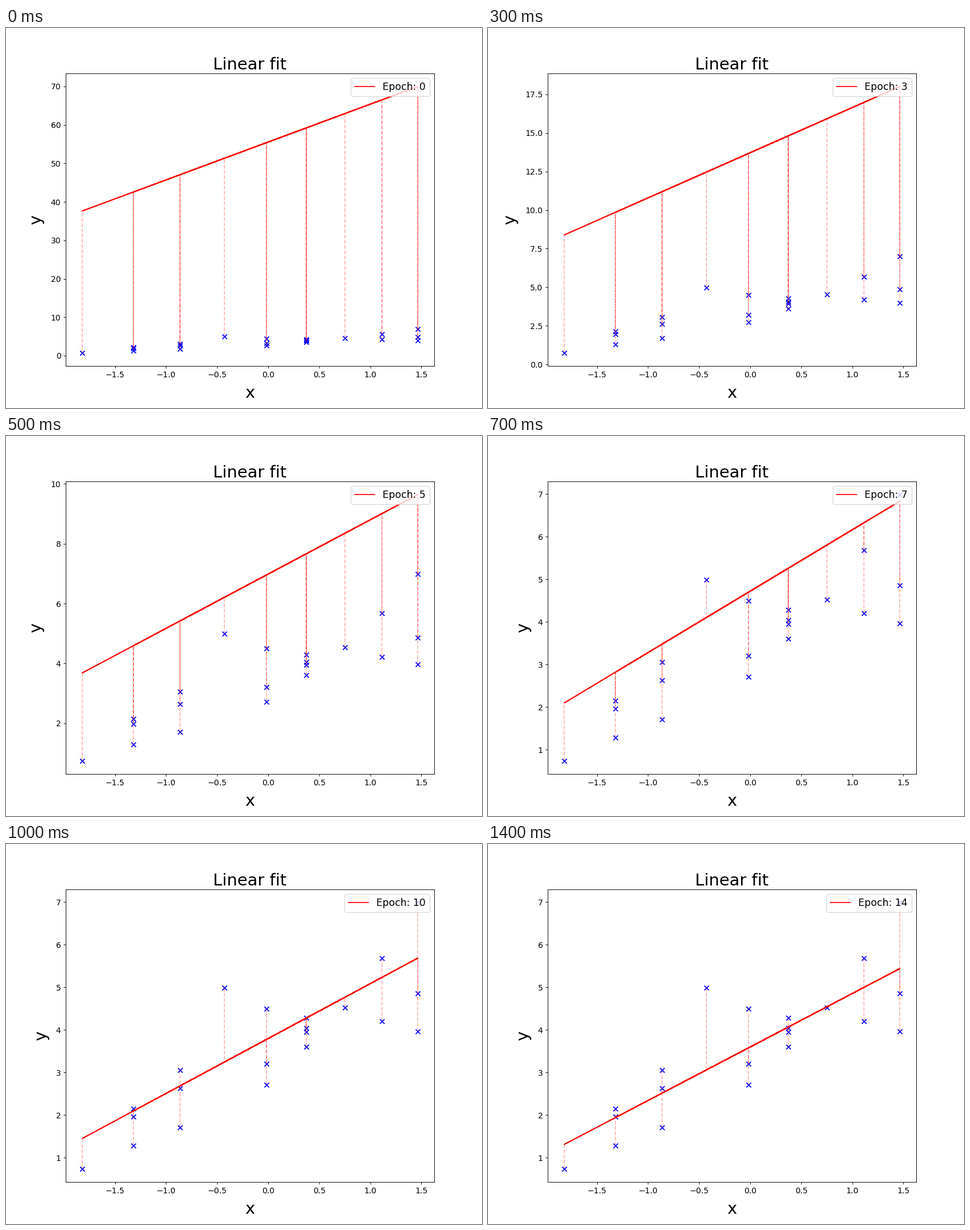
A matplotlib script that plays this animation: 837 by 669 pixels, repeating every 1500 ms.

```python
import matplotlib.pyplot as plt
import numpy as np
from matplotlib.animation import FuncAnimation

DPI = 83.7
NUDGE = 1e-6  # keeps the pixel size from rounding down
EPOCHS, INTERVAL = 15, 100
DECAY = 0.58  # share of the error left after each epoch
SLOPE_ERROR, BIAS_ERROR = 8.59, 51.98

# Measured values, grouped by evenly stepped x before scaling.
SAMPLES = [
    [0.74], [1.29, 1.97, 2.15], [1.71, 2.63, 3.06], [4.99],
    [2.71, 3.21, 4.50], [3.61, 3.95, 4.04, 4.29], [4.53],
    [4.21, 5.68], [3.97, 4.86, 6.99],
]


def standardise(values):
    return (values - values.mean()) / values.std()


steps = np.repeat(np.arange(len(SAMPLES)), [len(g) for g in SAMPLES])
order = (8 * np.arange(len(steps)) + 10) % len(steps)  # mixed, none repeated
xs = standardise((3.3 + steps) ** (2 / 3))[order]
ys = np.concatenate(SAMPLES)[order]
best_slope, best_bias = np.polyfit(xs, ys, 1)


def predict(epoch):
    """Gradient descent closes in on the best fit geometrically."""
    left = DECAY ** epoch
    slope = best_slope + SLOPE_ERROR * left
    return slope * xs + best_bias + BIAS_ERROR * left


def padded(values):
    low, high = np.min(values), np.max(values)
    pad = 0.05 * (high - low)
    return low - pad, high + pad


fig, ax = plt.subplots(figsize=(837 / DPI + NUDGE, 669 / DPI + NUDGE), dpi=DPI)
fig.subplots_adjust(top=0.8808)
ax.set_title("Linear fit", fontsize=25)
ax.set_xlabel("x", fontsize=25, labelpad=10)
ax.set_ylabel("y", fontsize=25, labelpad=10)
ax.tick_params(labelsize=12)

ax.scatter(xs, ys, s=50, marker="x", color="blue")
fit, = ax.plot(xs, predict(0), color="red", label="Epoch: 0")
errors = [ax.plot([x, x], [y, y], "--", color="red", alpha=0.3)[0]
          for x, y in zip(xs, ys)]
legend = ax.legend(loc="upper right", fontsize=15)
ax.set_xlim(padded(xs))


def draw(epoch):
    guess = predict(epoch)
    fit.set_ydata(guess)
    for line, y, end in zip(errors, ys, guess):
        line.set_ydata([y, end])
    ax.set_ylim(padded([ys, guess]))
    legend.get_texts()[0].set_text(f"Epoch: {epoch}")
    return [fit, legend, *errors]


anim = FuncAnimation(fig, draw, frames=EPOCHS, interval=INTERVAL,
                     repeat=True, repeat_delay=0, blit=False)
plt.show()
```
